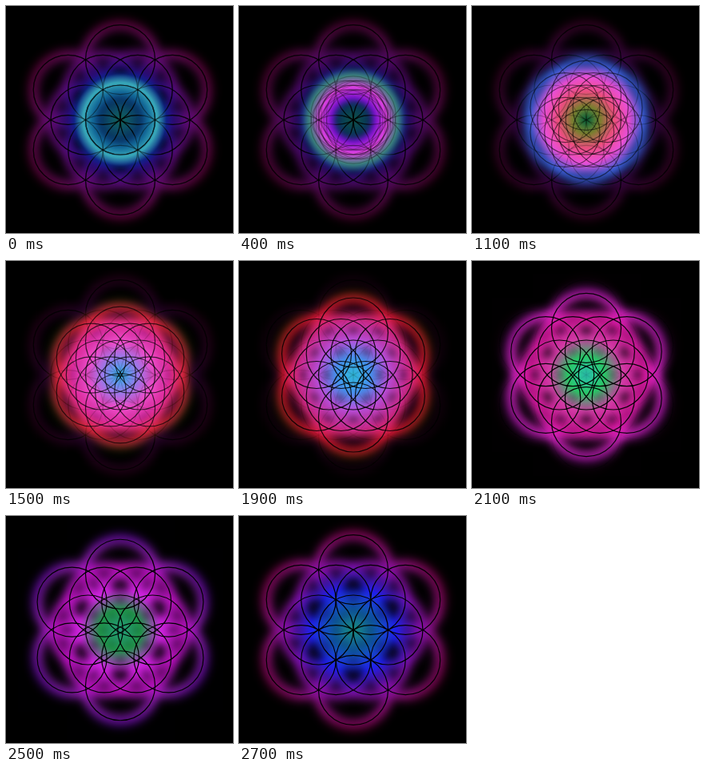
Write an HTML page with a canvas that moves like this. It is 284 px wide and 284 px high and loops after 2800 ms.

```html
<!DOCTYPE html>
<html lang="en">
<head>
<meta charset="utf-8">
<title>Expanding circles</title>
<style>
html, body { margin: 0; width: 100%; height: 100%; overflow: hidden; background: #000; }
canvas { display: block; width: 284px; height: 284px; }
</style>
</head>
<body>
<canvas id="stage" width="284" height="284"></canvas>
<script>
const SIZE = 284, CX = 143, CY = 142.5, RADIUS = 43.5;
const LOOP = 2800, STEP = 100, LAST = LOOP - STEP;
const SPREAD = RADIUS * Math.sqrt(3);
const GLOW = 7, PAD = 24;

// Colours from the centre to the rim at each key time
const palette = [
  [0, '0a3c60 0a3c60 0a3c68 126898 38a8b8 0c2880'],
  [700, '0a3860 5a2a90 f040a8 e8a090 3c6058 1040a0'],
  [1100, '108040 808030 f05080 f050d8 3c60d8 104890'],
  [1500, '30b8f0 9080f0 f050d0 f030a8 e02838 504010'],
  [1900, '30c0e0 4890f0 c050e0 e030a0 e01830 703010'],
  [2300, '30a878 708030 d82848 d010a0 6030d0 0858b0'],
  [2700, '188878 1060b8 2020f0 8010b0 980f80 700038']
].map(([time, list]) => ({ time, colors: list.split(' ').map(toHsl) }));

function toHsl(hex) {
  const [r, g, b] = [0, 2, 4].map(i => parseInt(hex.slice(i, i + 2), 16) / 255);
  const max = Math.max(r, g, b), min = Math.min(r, g, b), range = max - min;
  const light = (max + min) / 2;
  let hue = 4 + (r - g) / range;
  if (max === r) hue = (g - b) / range;
  else if (max === g) hue = 2 + (b - r) / range;
  return [hue * 60, 100 * range / (1 - Math.abs(2 * light - 1)), 100 * light];
}

// Blends along the shorter way round the colour wheel
function mix(a, b, k) {
  const turn = ((b[0] - a[0]) % 360 + 540) % 360 - 180;
  const hue = (a[0] + turn * k + 720) % 360;
  const [sat, light] = [1, 2].map(i => a[i] + (b[i] - a[i]) * k);
  return `hsl(${hue.toFixed(2)}, ${sat.toFixed(2)}%, ${light.toFixed(2)}%)`;
}

function colorsAt(time) {
  let i = 0;
  while (i < palette.length - 2 && time >= palette[i + 1].time) i++;
  const a = palette[i], b = palette[i + 1];
  const k = (time - a.time) / (b.time - a.time);
  return a.colors.map((color, n) => mix(color, b.colors[n], k));
}

function makeLayer(size) {
  const canvas = document.createElement('canvas');
  canvas.width = canvas.height = size;
  return canvas;
}

const ctx = document.getElementById('stage').getContext('2d');
const halo = makeHalo();
const layer = makeLayer(SIZE);
const paint = layer.getContext('2d');

function makeHalo() {
  const outer = RADIUS + PAD;
  const canvas = makeLayer(Math.ceil(outer * 2));
  const c = canvas.getContext('2d');
  const mid = canvas.width / 2;
  const fill = c.createRadialGradient(mid, mid, 0, mid, mid, outer);
  for (let i = 0; i <= 70; i++) {
    const off = (i / 70 * outer - RADIUS) / GLOW;
    fill.addColorStop(i / 70, `rgba(255,255,255,${(0.7 * Math.exp(-off * off / 2)).toFixed(4)})`);
  }
  c.fillStyle = fill;
  c.fillRect(0, 0, canvas.width, canvas.height);
  return canvas;
}

function centers(dist) {
  const points = [[CX, CY]];
  for (let i = 0; i < 12; i++) {
    const angle = i * Math.PI / 6;
    const d = i % 2 ? dist : dist / Math.sqrt(3);
    points.push([CX + d * Math.cos(angle), CY + d * Math.sin(angle)]);
  }
  return points;
}

function drawGlow(time, alpha) {
  const dist = SPREAD * time / LAST;
  const half = halo.width / 2;
  paint.globalCompositeOperation = 'source-over';
  paint.clearRect(0, 0, SIZE, SIZE);
  for (const [x, y] of centers(dist)) paint.drawImage(halo, x - half, y - half);

  const fill = paint.createRadialGradient(CX, CY, 0, CX, CY, dist + 58);
  colorsAt(time).forEach((color, i, all) => fill.addColorStop(i / (all.length - 1), color));
  paint.globalCompositeOperation = 'source-in';
  paint.fillStyle = fill;
  paint.fillRect(0, 0, SIZE, SIZE);

  ctx.globalAlpha = alpha;
  ctx.drawImage(layer, 0, 0);
  ctx.globalAlpha = 1;
}

function drawLines(time, alpha) {
  ctx.globalAlpha = alpha;
  ctx.strokeStyle = '#000';
  ctx.lineWidth = 1.2;
  for (const [x, y] of centers(SPREAD * time / LAST)) {
    ctx.beginPath();
    ctx.arc(x, y, RADIUS, 0, Math.PI * 2);
    ctx.stroke();
  }
  ctx.globalAlpha = 1;
}

function render(time) {
  const fade = 0.7 * Math.max(0, 1 - time / 2300);
  ctx.fillStyle = '#000';
  ctx.fillRect(0, 0, SIZE, SIZE);
  if (fade > 0) {
    drawGlow(LAST, fade);
    drawLines(LAST, 0.8);
  }
  drawGlow(time, 1);
  drawLines(LAST, fade * 0.6);
  drawLines(time, Math.min(1, 0.08 + time / 2400));
}

const start = performance.now();
let shown = -1;
function tick() {
  const time = Math.floor((performance.now() - start) % LOOP / STEP) * STEP;
  if (time !== shown) render(shown = time);
  requestAnimationFrame(tick);
}
tick();
</script>
</body>
</html>
```
